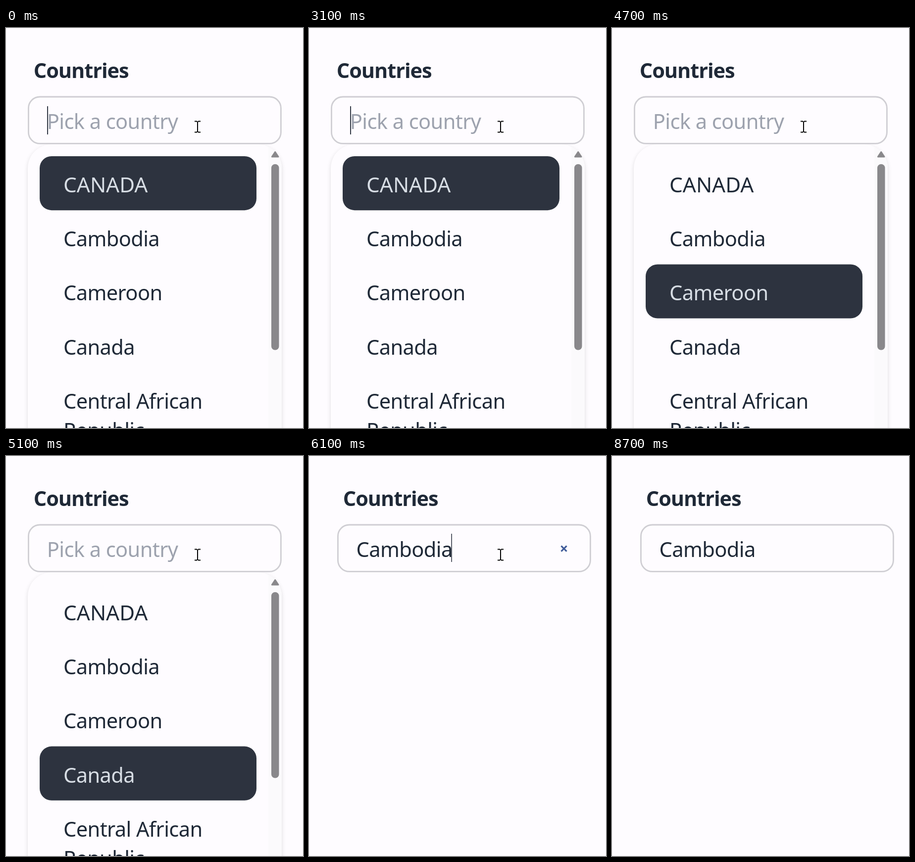
Animation, 600 px wide and 808 px high, one loop 8.8 s. Source, as an HTML page with a canvas:

```html
<!DOCTYPE html>
<html lang="en">
<head>
<meta charset="utf-8">
<title>Country picker</title>
<style>
  html, body { margin: 0; width: 100%; height: 100%; overflow: hidden; background: #fefcff; }
  canvas { display: block; }
</style>
</head>
<body>
<canvas id="stage" width="600" height="808"></canvas>
<script>
const ctx = document.getElementById('stage').getContext('2d');

const LOOP = 8800, STEP = 100, FADE = 200, PICKED = 6100;
const PAGE = '#fefcff', INK = [31, 41, 55], LIGHT = [215, 221, 228];
const FONT = '"Noto Sans", "Open Sans", sans-serif';
const ROW_TOP = 259, ROW_H = 109.2;

// Type styles: weight, size, tracking
const BODY = [400, 41.6, -0.6], CAPS = [400, 42.4, 0], TITLE = [700, 41.5, -1.05];

const rows = ['CANADA', 'Cambodia', 'Cameroon', 'Canada', 'Central African'];
// Highlight moves: [start time, row]
const moves = [[4168, 1], [4495, 2], [4870, 3], [5130, 2], [5383, 1]];
const caretOn = [
  [0, 300], [800, 1300], [1700, 2500], [3100, 3600], [4100, 4700],
  [5200, 5700], [6100, 6600], [7200, 7700], [8200, 8700]
];

const rgb = c => `rgb(${c.map(Math.round).join(',')})`;
const mix = (a, b, k) => a.map((v, i) => v + (b[i] - v) * k);

// cubic-bezier(0, 0, 0.2, 1)
function ease(x) {
  if (x <= 0) return 0;
  if (x >= 1) return 1;
  let lo = 0, hi = 1;
  for (let i = 0; i < 24; i++) {
    const u = (lo + hi) / 2;
    if (0.6 * u * u + 0.4 * u * u * u < x) lo = u; else hi = u;
  }
  return 3 * lo * lo - 2 * lo * lo * lo;
}

function highlight(row, t) {
  let v = row === 0 ? 1 : 0;
  for (const [start, target] of moves) {
    v += ((target === row ? 1 : 0) - v) * ease((t - start) / FADE);
  }
  return v;
}

function box(x, y, w, h, r) {
  ctx.beginPath();
  ctx.roundRect(x, y, w, h, r);
}

function text(str, x, y, color, [weight, size, tracking] = BODY) {
  ctx.font = `${weight} ${size}px ${FONT}`;
  ctx.letterSpacing = `${tracking}px`;
  ctx.fillStyle = color;
  ctx.fillText(str, x, y);
}

function lines(color, width, ...paths) {
  ctx.strokeStyle = color;
  ctx.lineWidth = width;
  ctx.beginPath();
  for (const [x1, y1, x2, y2] of paths) {
    ctx.moveTo(x1, y1);
    ctx.lineTo(x2, y2);
  }
  ctx.stroke();
}

function drawMenu(t) {
  ctx.save();
  ctx.shadowColor = 'rgba(0,0,0,0.13)';
  ctx.shadowBlur = 9;
  ctx.shadowOffsetY = 3;
  ctx.fillStyle = PAGE;
  box(44, 235, 513, 700, 48);
  ctx.fill();
  ctx.restore();

  ctx.save();
  ctx.clip();
  ctx.fillStyle = '#fbfafc';
  ctx.fillRect(530, 235, 27, 573);
  ctx.restore();

  ctx.fillStyle = ctx.strokeStyle = '#89888b';
  box(536, 275, 15.5, 375.5, 7.5);
  ctx.fill();
  ctx.lineJoin = 'round';
  ctx.lineWidth = 3;
  ctx.beginPath();
  ctx.moveTo(543.7, 250.5);
  ctx.lineTo(550, 260);
  ctx.lineTo(537.4, 260);
  ctx.closePath();
  ctx.fill();
  ctx.stroke();

  rows.forEach((name, i) => {
    const k = highlight(i, t), y = ROW_TOP + ROW_H * i;
    if (k > 0) {
      ctx.fillStyle = `rgba(45,51,63,${k})`;
      box(68, y, 438, ROW_H, 24);
      ctx.fill();
    }
    text(name, 116, y + 73, rgb(mix(INK, LIGHT, k)), i === 0 ? CAPS : BODY);
  });
  text('Republic', 116, 828, rgb(INK));
}

function drawBeam(x, y) {
  lines('#000', 2,
    [x, y - 9, x, y + 10],
    [x - 6, y - 11, x - 1, y - 11], [x + 1, y - 11, x + 6, y - 11],
    [x - 6, y + 11, x - 1, y + 11], [x + 1, y + 11, x + 6, y + 11]);
  lines('#000', 1.5, [x - 1.5, y - 11, x, y - 9], [x + 1.5, y - 11, x, y - 9],
    [x - 1.5, y + 11, x, y + 9], [x + 1.5, y + 11, x, y + 9]);
}

function drawArrow(x, y) {
  const pts = [[0, 0], [0, 23], [5, 18], [9, 27], [13, 25], [9, 17], [16, 17]];
  ctx.beginPath();
  pts.forEach(([dx, dy]) => ctx.lineTo(x + dx, y + dy));
  ctx.closePath();
  ctx.fillStyle = '#fff';
  ctx.fill();
  ctx.strokeStyle = '#000';
  ctx.lineWidth = 1.5;
  ctx.stroke();
}

function drawPointer(t) {
  if (t >= 7700) return;
  const k = Math.max(0, (t - 7300) / 400);
  const x = 387 + 230 * k, y = 199.5 - 220 * k;
  if (y > 138) drawBeam(x, y); else drawArrow(x, y);
}

function draw(t) {
  const open = t < PICKED, dx = open ? 0 : 13;
  ctx.fillStyle = PAGE;
  ctx.fillRect(0, 0, 600, 808);
  if (open) drawMenu(t);

  text('Countries', 55.8 + dx, 101, rgb(INK), TITLE);
  box(45.4 + dx, 139, 510, 94.4, 23);
  ctx.fillStyle = PAGE;
  ctx.fill();
  ctx.strokeStyle = '#cfced3';
  ctx.lineWidth = 2.8;
  ctx.stroke();

  if (open) {
    text('Pick a country', 82.8, 204, '#9da2ae');
  } else {
    text('Cambodia', 95.6, 204, rgb(INK));
    if (t < 8700) {
      lines('#405c99', 3.2, [509.5, 181.7, 520.5, 192.7], [520.5, 181.7, 509.5, 192.7]);
    }
  }
  if (caretOn.some(([a, b]) => t >= a && t < b)) {
    ctx.fillStyle = '#343b47';
    ctx.fillRect(open ? 83 : 287.3, open ? 158 : 157, open ? 2 : 1.6, 57);
  }
  drawPointer(t);
}

const begin = performance.now();
function tick() {
  const t = (performance.now() - begin) % LOOP;
  draw(Math.floor(t / STEP) * STEP);
  requestAnimationFrame(tick);
}
tick();
</script>
</body>
</html>
```
